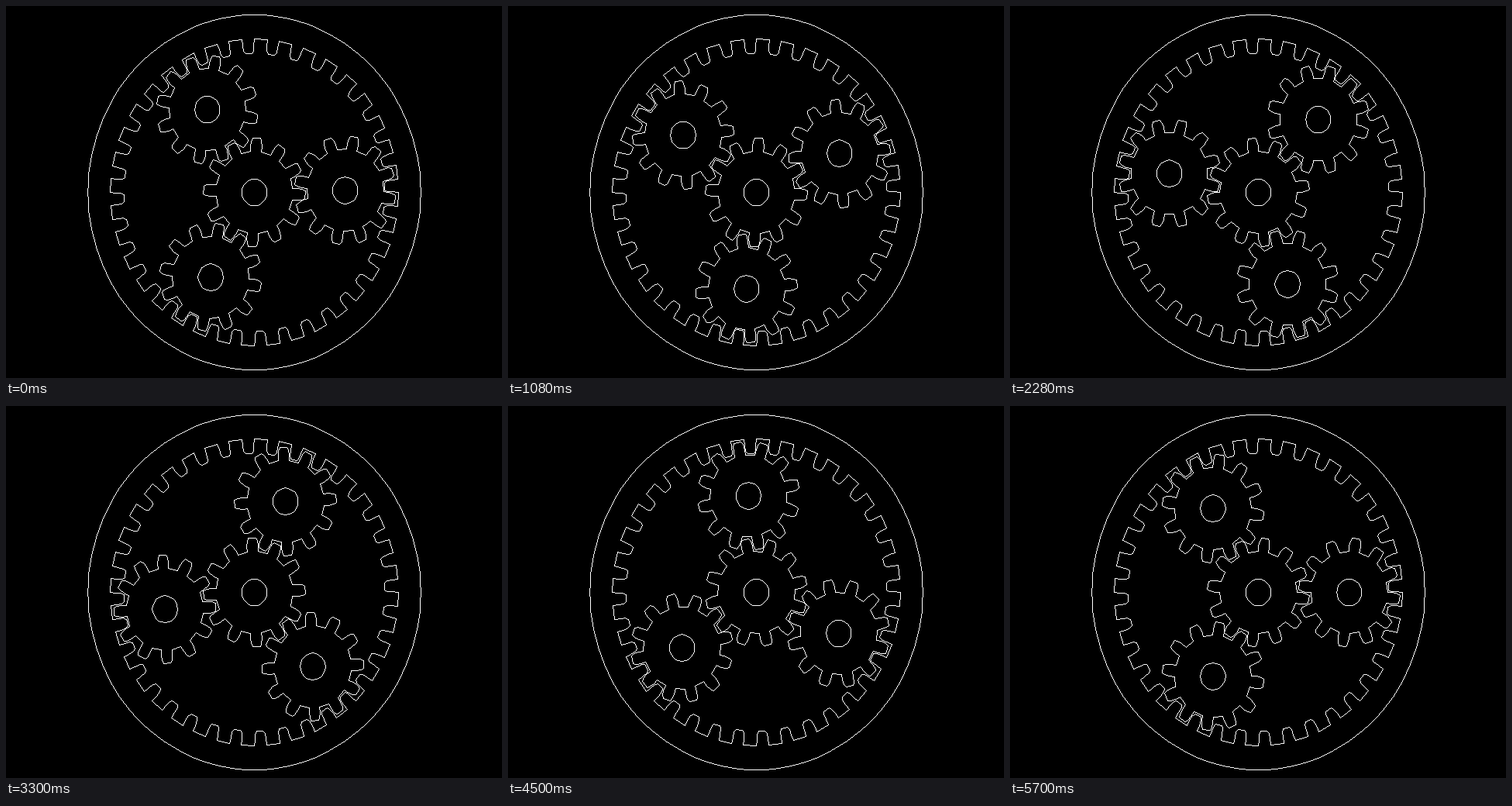
Recreate the animation shown at these times as an HTML page with a canvas. Size 640 px wide and 480 px high, loop 5760 ms.

```html
<!DOCTYPE html>
<html>
<head>
<meta charset="utf-8">
<title>Planetary gears</title>
<style>
html, body { margin: 0; width: 100%; height: 100%; overflow: hidden; background: #000; }
canvas { display: block; }
</style>
</head>
<body>
<canvas id="stage" width="640" height="480"></canvas>
<script>
const ctx = document.getElementById('stage').getContext('2d');
const RAD = Math.PI / 180;
const STEP_MS = 60, STEPS = 96, ORBIT = 125;
const CX = 320, CY = 240, ASPECT = 0.9375;

// Half tooth profiles: [radius, half width], from root to tip
const GEAR = [[53, 7.3], [60, 7.6], [66.5, 6.8], [70, 5]];
const RING = [[198, 8.2], [190, 7.6], [183, 6.6], [179.5, 4.4]];

const polar = (r, deg) => [r * Math.cos(deg * RAD), r * Math.sin(deg * RAD)];

// One-pixel line without smoothing
function line(x0, y0, x1, y1) {
  const n = Math.max(1, Math.abs(x1 - x0), Math.abs(y1 - y0));
  for (let i = 0; i <= n; i++) {
    ctx.fillRect(Math.round(x0 + (x1 - x0) * i / n), Math.round(y0 + (y1 - y0) * i / n), 1, 1);
  }
}

function outline(points, [ox, oy]) {
  const px = points.map(([x, y]) => [
    Math.round(CX + (ox + x) * ASPECT),
    Math.round(CY - oy - y)
  ]);
  px.forEach((p, i) => line(...p, ...px[(i + 1) % px.length]));
}

function circle(r, center, sides) {
  outline(Array.from({ length: sides }, (_, i) => polar(r, i * 360 / sides)), center);
}

function toothed(profile, teeth, phase, center) {
  const points = [];
  for (let i = 0; i < teeth; i++) {
    const mid = phase + i * 360 / teeth;
    const flank = side => ([r, w]) => polar(r, mid + side * Math.asin(w / r) / RAD);
    points.push(...profile.map(flank(-1)), ...profile.map(flank(1)).reverse());
  }
  outline(points, center);
}

function gear(phase, center) {
  toothed(GEAR, 12, phase, center);
  circle(17.3, center, 24);
}

function draw(step) {
  const carrier = 1.25 * (step + 1);
  ctx.fillStyle = '#000';
  ctx.fillRect(0, 0, 640, 480);
  ctx.fillStyle = '#fff';
  circle(229, [0, 0], 120);
  toothed(RING, 36, 2.5, [0, 0]);
  gear(22.5 + 4 * carrier, [0, 0]);
  for (let i = 0; i < 3; i++) {
    gear(22.5 - 2 * carrier, polar(ORBIT, carrier + 120 * i));
  }
}

const start = performance.now();
let shown = -1;
function tick() {
  const step = Math.floor((performance.now() - start) / STEP_MS) % STEPS;
  if (step !== shown) draw(shown = step);
  requestAnimationFrame(tick);
}
tick();
</script>
</body>
</html>
```
